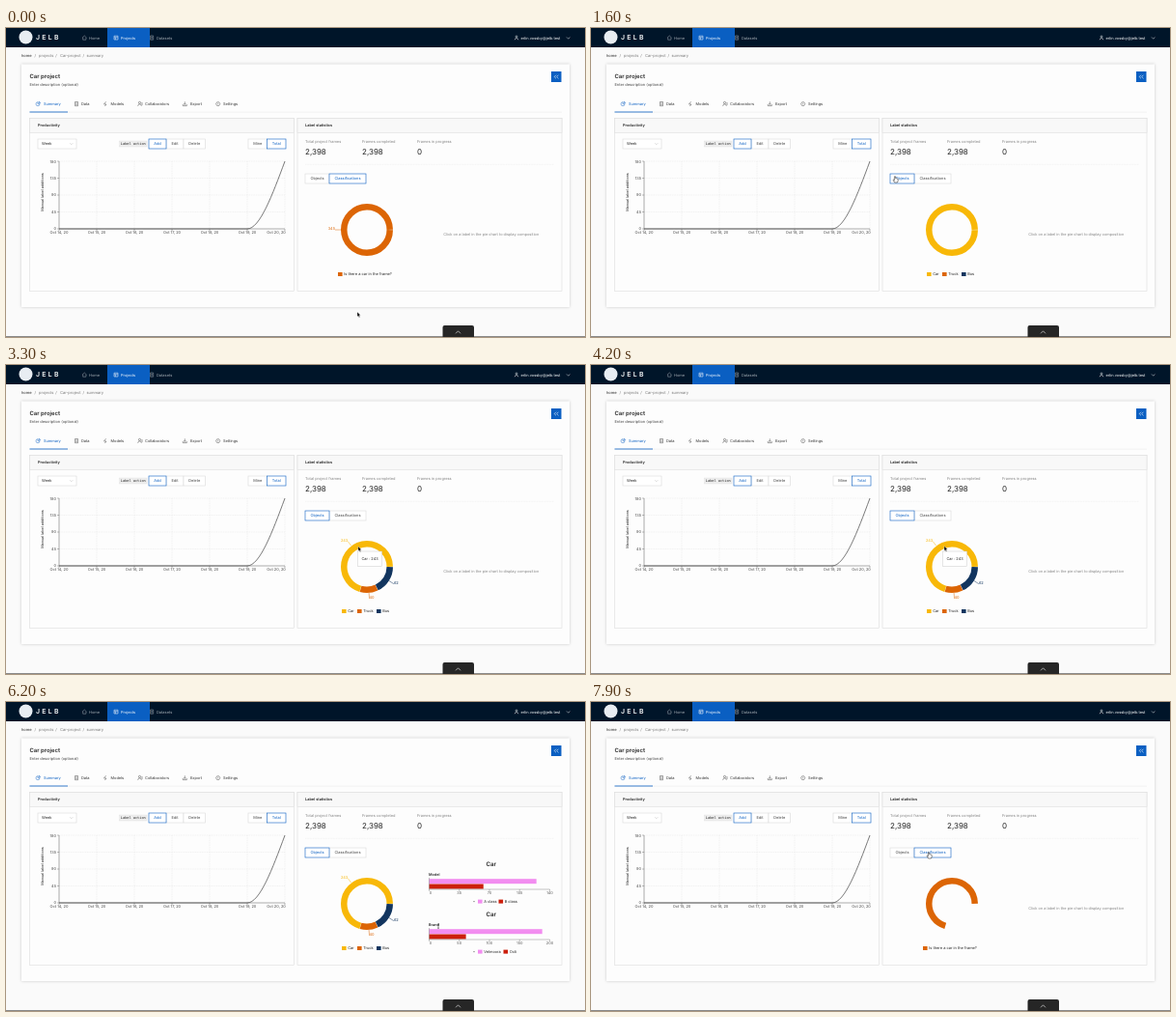
An HTML page that plays this animation: 600 by 320 pixels, repeating every 8000 ms.

```html
<!DOCTYPE html>
<html lang="en">
<head>
<meta charset="utf-8">
<title>Project dashboard</title>
<style>
  html, body { margin: 0; width: 100%; height: 100%; overflow: hidden; background: #fafafa; }
  svg { display: block; width: 600px; height: 320px; }
  text { font-family: Inter, sans-serif; text-rendering: geometricPrecision; white-space: pre; }
</style>
</head>
<body>
<svg id="stage" viewBox="0 0 600 320"></svg>
<script>
const LOOP = 8000;
const BLUE = '#0a5fc2', INK = '#262626', GREY = '#858585', LINE = '#dedede';
const YELLOW = '#f8b808', ORANGE = '#dc6505', NAVY = '#12355f', PINK = '#f28df0', RED = '#cc1f0c';
const stage = document.getElementById('stage');

// y is the vertical middle of the text
const text = (x, y, str, { size = 3.95, fill = INK, anchor = 'start', weight = 400, more = '' } = {}) =>
  `<text x="${x}" y="${y + size * .36}" font-size="${size}" fill="${fill}" text-anchor="${anchor}" font-weight="${weight}" ${more}>${str}</text>`;
const rect = (x, y, w, h, fill, more = '') =>
  `<rect x="${x}" y="${y}" width="${w}" height="${h}" fill="${fill}" ${more}/>`;
const path = (d, stroke, width = .5, more = '') =>
  `<path d="${d}" fill="none" stroke="${stroke}" stroke-width="${width}" ${more}/>`;
const group = (id, body, more = '') => `<g id="${id}" ${more}>${body}</g>`;
const button = (x, y, w, label, active) =>
  rect(x, y, w, 10, '#fff', `stroke="${active ? BLUE : '#d9d9d9'}" stroke-width=".6"`) +
  text(x + w / 2, y + 5, label, { anchor: 'middle', fill: active ? BLUE : '#444' });
const swatch = (x, y, color, label) => rect(x, y - 2, 4.6, 4, color) + text(x + 6.2, y, label);
const middle = { anchor: 'middle' };

function header() {
  const pale = { fill: '#a6adb4' };
  return rect(0, 0, 600, 20, '#001529') + rect(105, 0, 44, 20, BLUE) +
    '<circle cx="20.5" cy="9.5" r="7" fill="#e8edf2"/>' +
    text(31, 9.5, 'JELB', { size: 6.9, fill: '#fff', weight: 600, more: 'letter-spacing="2.3"' }) +
    path('M79 10.2L81.3 8L83.6 10.2M79.7 9.8V12.2H82.9V9.8', '#a6adb4') + text(86, 10.2, 'Home', pale) +
    path('M112 8.2H116V12H112ZM112 9.7H116M113.4 9.7V12', '#fff') + text(119, 10.2, 'Projects', { fill: '#fff' }) +
    path('M149.6 8H152.6V12.2H149.6ZM150.3 9.4H152M150.3 10.8H152', '#a6adb4') + text(156, 10.2, 'Datasets', pale) +
    '<circle cx="529" cy="9" r="1" fill="none" stroke="#fff" stroke-width=".5"/>' +
    path('M527.2 12.3Q527.4 10.5 529 10.5T530.8 12.3', '#fff') +
    text(533.5, 10.2, 'erlin.vossby@jelb.test', { fill: '#fff' }) +
    path('M581 9.5L582.7 11.2L584.4 9.5', '#fff');
}

function page() {
  const crumbs = [[16, 'home'], [29.4, '/'], [34, 'projects'], [51.3, '/'], [56, 'Car-project'], [79.4, '/'], [83.5, 'summary']];
  const tabs = [[39, 'Summary'], [78, 'Data'], [108.5, 'Models'], [144, 'Collaborators'], [191, 'Export'], [225, 'Settings']];
  const icons = ['M33 76.7A2 2 0 1 0 35 78.7H33ZM34 76.2A1.8 1.8 0 0 1 35.6 77.8H34Z',
    'M71.5 76.5H74.5V80.7H71.5ZM72.2 78H73.8M72.2 79.3H73.8', 'M103.6 76.3L101.5 79H104L102.4 81',
    'M136.6 80.8Q137 78.8 138.5 78.8T140.4 80.8M137.4 77.4A1 1 0 1 1 139.6 77.4A1 1 0 1 1 137.4 77.4M141 77V80',
    'M183.3 79V80.6H187.3V79M185.3 76.3V79.4M184.2 78.3L185.3 79.4L186.4 78.3',
    'M217.6 78.6L218.6 76.8H220.8L221.8 78.6L220.8 80.4H218.6ZM219.2 78.6H220.2'];
  return crumbs.map(([x, s], i) => text(x, 29, s, { size: 4, fill: i ? '#777' : '#222' })).join('') +
    rect(16, 37.5, 568, 251.5, '#fdfdfd', 'style="filter:drop-shadow(0 .5px 1.5px #0003)"') +
    text(24.5, 49.8, 'Car project', { size: 5.9, weight: 600 }) +
    text(24.5, 59, 'Enter description (optional)', { fill: '#444' }) +
    rect(565, 45, 10.5, 11, BLUE) +
    path('M570 48.7L568.2 50.5L570 52.3M572.5 48.7L570.7 50.5L572.5 52.3', '#fff', .6) +
    tabs.map(([x, s], i) => text(x, 78.5, s, { fill: i ? '#333' : BLUE }) + path(icons[i], i ? '#333' : BLUE, .45)).join('') +
    path('M24 87.2H576', '#e6e6e6') + path('M24.5 87H64', BLUE, .8);
}

const panel = (x, title, pad) =>
  rect(x, 93.5, 274, 179, '#fdfdfd', `stroke="${LINE}" stroke-width=".6"`) +
  rect(x, 93.5, 274, 15, '#f8f8f8', `stroke="${LINE}" stroke-width=".6"`) +
  text(x + pad, 100.8, title, { size: 3.9, weight: 600 });

function productivity() {
  let out = panel(24.5, 'Productivity', 8.5) +
    rect(33, 115, 40, 10, '#fff', 'stroke="#d9d9d9" stroke-width=".6"') + text(37, 120, 'Week') +
    path('M66.3 119.2L67.8 120.7L69.3 119.2', '#aaa', .4) +
    rect(117.5, 117, 28.5, 6, '#eee', 'stroke="#ddd" stroke-width=".4"') +
    text(131.8, 120, 'Label action', { size: 3.6, anchor: 'middle', more: 'style="font-family:\'DejaVu Sans Mono\',monospace"' }) +
    button(166, 115, 18, 'Edit') + button(184, 115, 22.5, 'Delete') + button(148, 115, 18, 'Add', true) +
    button(251, 115, 19.5, 'Mine') + button(270.5, 115, 19.5, 'Total', true);
  for (let i = 0; i < 5; i++) {
    const y = 208 - i * 17.5;
    if (i) out += path(`M55 ${y}H289`, LINE, .4, 'stroke-dasharray="1 .7"');
    out += path(`M53 ${y}H55`, '#555', .4) + text(52, y + (i === 4 ? .8 : 0), i * 45, { anchor: 'end', fill: '#444' });
  }
  for (let i = 0; i < 7; i++) {
    const x = 55 + i * 39;
    if (i) out += path(`M${x} 138V208`, LINE, .4, 'stroke-dasharray="1 .7"');
    out += path(`M${x} 208V210`, '#555', .4) +
      text(i === 6 ? 280 : x, 212, `Oct ${14 + i}, 20`, { anchor: 'middle', fill: '#444' });
  }
  return out + path('M55 138V208H289', '#555', .5) +
    path('M55 208H250C263 208 276 173 289 138', '#222', .6) +
    text(0, 0, 'Manual label additions', { size: 3.75, anchor: 'middle', more: 'transform="translate(37.3 170) rotate(-90)"' });
}

const stat = (x, label, value) =>
  text(x, 117.5, label, { fill: GREY }) + text(x, 128, value, { size: 8, fill: '#222' });

function barChart(top, title, step, names, values) {
  let out = text(502.8, top, 'Car', { size: 6.2, weight: 600, anchor: 'middle' }) +
    text(438, top + 10.5, title, { size: 3.8, weight: 600 }) +
    values.map((v, i) => rect(438.5, top + 15.2 + i * 5.3, 0, 5, i ? RED : PINK, `class="bar" data-w="${v / step * 31.25}"`)).join('') +
    path(`M438.5 ${top + 14}V${top + 26}H563.5`, '#666', .4);
  for (let i = 0; i < 5; i++) {
    const x = 438.5 + i * 31.25;
    out += path(`M${x} ${top + 26}v1.8`, '#666', .4) + text(i ? x : 440, top + 30, i * step, { anchor: 'middle', fill: '#555' });
  }
  const [first, second, x2] = names;
  return out + `<circle cx="485" cy="${top + 38.6}" r=".6" fill="#555"/>` +
    swatch(489, top + 38.6, PINK, first) + swatch(x2, top + 38.6, RED, second);
}

const CX = 374, CY = 209, FULL = 345;
const parts = [[243, YELLOW], [40, ORANGE], [62, NAVY]];
const CAR_SPAN = 243 / FULL * 360;

// Angles run counter-clockwise from the right
function donut(sectors, labels) {
  let start = 0, out = '';
  for (const [value, color, span] of sectors) {
    const a = (start + span / 2) * Math.PI / 180, c = Math.cos(a), s = -Math.sin(a);
    if (span > .8) out += `<circle r="23.75" transform="translate(${CX} ${CY}) scale(1 -1)" pathLength="360" fill="none"
      stroke="${color}" stroke-width="6.5" stroke-dasharray="${span - .7} 360" stroke-dashoffset="${-start - .35}"/>`;
    if (labels) out += path(`M${CX + 27 * c} ${CY + 27 * s}L${CX + 33 * c} ${CY + 33 * s}`, color) +
      text(CX + 33 * c, CY + 33 * s - 1.3, value, { fill: color, anchor: c > 0 ? 'start' : 'end' });
    start += span;
  }
  return out;
}

stage.innerHTML = rect(0, 0, 600, 320, '#fafafa') + header() + page() + productivity() +
  panel(302, 'Label statistics', 8) +
  stat(310, 'Total project frames', '2,398') + stat(369, 'Frames completed', '2,398') + stat(426, 'Frames in progress', '0') +
  path('M310 141.3H568', '#e4e4e4', .4, 'stroke-dasharray="1 .6"') +
  group('classes', button(310, 151, 25, 'Objects') + button(335, 151, 38, 'Classifications', true) +
    swatch(344, 255, ORANGE, 'Is there a car in the frame?')) +
  group('objects', button(335, 151, 38, 'Classifications') + button(310, 151, 25, 'Objects', true) +
    swatch(348, 255, YELLOW, 'Car') + swatch(364, 255, ORANGE, 'Truck') + swatch(384, 255, NAVY, 'Bus')) +
  group('pie', '') +
  group('hint', text(502.8, 214, 'Click on a label in the pie chart to display composition', { size: 3.9, fill: GREY, anchor: 'middle' })) +
  group('charts', barChart(168, 'Model', 35, ['A class', 'B class', 510.5], [124.5, 63]) +
    barChart(220, 'Brand', 50, ['Velmoora', 'Oxti', 515.5], [187.5, 61])) +
  group('tooltip', rect(364.5, 193, 25, 15.5, '#fff', 'stroke="#ccc" stroke-width=".5"') + text(377, 200.8, 'Car : 243', middle)) +
  rect(0, 319, 600, 1, '#8a8a8a') +
  '<path d="M452.5 320V310Q452.5 308 454.5 308H483Q485 308 485 310V320Z" fill="#262626"/>' +
  path('M466 316.3L468.5 313.8L471 316.3', '#fff', .6) +
  group('arrow', '<path d="M0 0V4.9L1.1 3.9L1.9 5.7L2.8 5.3L2 3.6H3.5Z" fill="#000" stroke="#fff" stroke-width=".35"/>') +
  group('hand', '<path d="M-.6 2.8V-1.2Q0 -2 .6 -1.2V.6Q1.3 .2 1.6 .9Q2.3 .5 2.5 1.2Q3.2 1 3.2 1.8V3.2L2.5 5H-.4L-2 2.4Q-1.7 1.5 -.6 2.8Z" fill="#fff" stroke="#111" stroke-width=".5"/>') +
  group('beam', path('M-1 -2.3Q0 -2.3 0 -1.5Q0 -2.3 1 -2.3M0 -1.6V1.8M-1 2.5Q0 2.5 0 1.7Q0 2.5 1 2.5', '#222', .5));

const el = Object.fromEntries([...stage.querySelectorAll('[id]')].map(e => [e.id, e]));
const bars = stage.querySelectorAll('.bar');
const show = (id, on) => { el[id].style.display = on ? '' : 'none'; };
const clamp = x => Math.min(1, Math.max(0, x));
const easeOut = x => 1 - (1 - clamp(x)) ** 3;

// Pointer stops: time, x, y
const stops = [[0, 364, 294], [400, 362, 307], [900, 346, 246], [1250, 315, 155], [1700, 315, 155],
  [2550, 337, 197], [3400, 366, 187.5], [4200, 366, 187.5], [4500, 380, 184], [5050, 380, 184],
  [6100, 448, 232], [6300, 448, 232], [6800, 466, 241], [7650, 350, 157], [LOOP, 350, 157]];

function pointerAt(t) {
  const i = stops.findIndex(s => s[0] > t);
  const [t0, x0, y0] = stops[i - 1], [t1, x1, y1] = stops[i];
  const u = (t - t0) / (t1 - t0), k = u * u * (3 - 2 * u);
  return [x0 + (x1 - x0) * k, y0 + (y1 - y0) * k];
}

function draw(t) {
  const objects = t >= 1300 && t < 7780;
  const charts = objects && t >= 4450;
  show('objects', objects);
  show('classes', !objects);
  show('charts', charts);
  show('hint', !charts);

  const k = easeOut((t - 1600) / 1100);
  el.pie.innerHTML = objects
    ? donut(parts.map(([v, color], i) => [v, color, (i ? 0 : 360) * (1 - k) + v / FULL * 360 * k]), t >= 2900)
    : donut([[FULL, ORANGE, t < 1300 ? 360 : CAR_SPAN]], t < 1300);

  const grow = easeOut((t - 4450) / 400);
  bars.forEach(b => b.setAttribute('width', b.dataset.w * grow));

  const [x, y] = pointerAt(t);
  const onButton = x > 310 && x < 373 && y > 151 && y < 161;
  const onTitle = charts && x > 438 && x < 450 && y > 228 && y < 234;
  const radius = Math.hypot(x - CX, y - CY);
  show('tooltip', objects && radius > 20.5 && radius < 27);
  show('hand', onButton);
  show('beam', onTitle);
  show('arrow', !onButton && !onTitle);
  for (const id of ['hand', 'beam', 'arrow']) el[id].setAttribute('transform', `translate(${x} ${y})`);
}

function tick() {
  draw(performance.now() % LOOP);
  requestAnimationFrame(tick);
}
tick();
</script>
</body>
</html>
```
